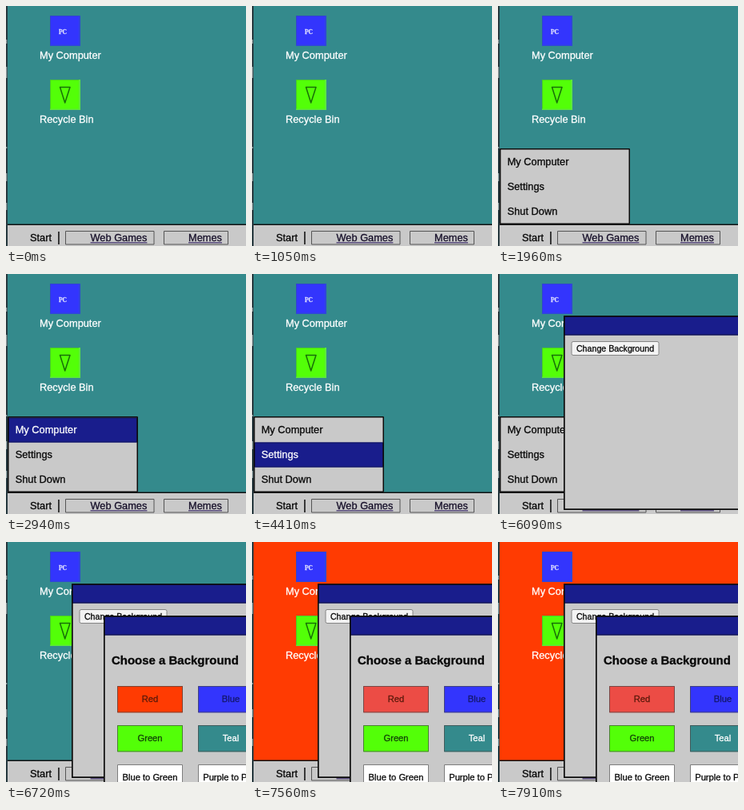
An HTML page with a canvas for the animation above (8000 ms loop, 300 by 300 pixels).

```html
<!DOCTYPE html>
<html lang="en">
<head>
<meta charset="utf-8">
<title>Desktop</title>
<style>
html, body { margin: 0; width: 100%; height: 100%; overflow: hidden; background: #348a8c; }
canvas { display: block; width: 100vw; height: 100vh; }
</style>
</head>
<body>
<canvas id="stage"></canvas>
<script>
const LOOP = 8000;
const SANS = '"Liberation Sans", Arial, sans-serif';
const SERIF = '"Liberation Serif", Times, serif';
const C = {
  teal: '#348a8c', red: '#ff3b02', green: '#53ff08', blue: '#3335fd',
  grey: '#c9c9c9', navy: '#191d8c', ink: '#080808'
};
const AT = {
  menu: 1820, settingsWindow: 4480, buttonHover: 6300,
  chooser: 6440, redHover: 7000, redDesktop: 7420
};
// Menu row under the pointer from each time on; -1 is none.
const HOVER = [[0, -1], [2450, 2], [2590, 1], [2870, 0], [3710, 1], [4900, -1]];
const ROWS = ['My Computer', 'Settings', 'Shut Down'];

const canvas = document.getElementById('stage');
const ctx = canvas.getContext('2d');

function fit() {
  const dpr = window.devicePixelRatio || 1;
  canvas.width = Math.round(innerWidth * dpr);
  canvas.height = Math.round(innerHeight * dpr);
}

function rect(x, y, w, h, fill) {
  ctx.fillStyle = fill;
  ctx.fillRect(x, y, w, h);
}

function frame(x, y, w, h, stroke, line = 1) {
  ctx.strokeStyle = stroke;
  ctx.lineWidth = line;
  ctx.strokeRect(x + line / 2, y + line / 2, w - line, h - line);
}

// A hairline outline gives the slightly heavy look of the lettering.
function text(str, x, y, fill, size = 12.8, align = 'left', face = SANS, weight = '') {
  ctx.font = `${weight} ${size}px ${face}`;
  ctx.textAlign = align;
  ctx.fillStyle = ctx.strokeStyle = fill;
  ctx.lineWidth = 0.3;
  ctx.lineJoin = 'round';
  ctx.fillText(str, x, y);
  ctx.strokeText(str, x, y);
}

function icon(y, fill, light, dark, label) {
  rect(55, y, 38, 38, fill);
  rect(55, y, 38, 1, dark);
  rect(55, y, 1, 38, dark);
  rect(91, y, 2, 38, light);
  rect(55, y + 36.5, 38, 1.5, light);
  text(label, 42, y + 54, '#fff');
}

function desktop(fill) {
  rect(0, 0, 300, 300, fill);
  icon(12, C.blue, '#3046da', '#2f45cc', 'My Computer');
  text('PC', 66, 34.5, '#dcdcff', 7.5, 'left', SERIF, 'bold');
  icon(92, C.green, '#5ce83c', '#48cc28', 'Recycle Bin');
  ctx.beginPath();
  ctx.moveTo(67.5, 101.5);
  ctx.lineTo(80, 101.5);
  ctx.lineTo(73.7, 121);
  ctx.closePath();
  ctx.strokeStyle = '#187008';
  ctx.lineWidth = 1.5;
  ctx.stroke();
}

function link(label, x, w, textX) {
  frame(x, 281, w, 17.5, '#555');
  text(label, textX, 294, '#17102a');
  rect(textX, 295.2, ctx.measureText(label).width, 1.2, '#40306c');
}

function taskbar() {
  rect(0, 273, 300, 27, C.grey);
  rect(0, 272.5, 300, 1.5, '#111');
  text('Start', 30, 294, C.ink);
  rect(65.2, 282, 1.5, 16, C.ink);
  link('Web Games', 74, 111.5, 105.5);
  link('Memes', 197, 81, 228);
}

function screenEdge() {
  rect(0, 0, 2, 300, '#26383e');
  for (const [y, h] of [[42, 5], [76, 14], [176, 2], [209, 10], [246, 9]]) {
    rect(0, y, 1.3, h, '#8fa0a3');
  }
}

function startMenu(active) {
  rect(2, 178, 163, 95, C.grey);
  ROWS.forEach((label, i) => {
    const y = 179.5 + i * 31;
    if (i === active) {
      rect(3, y, 161, 31, C.navy);
      frame(3, y, 161, 31, '#10145c');
    }
    text(label, 11.7, y + 19.8, i === active ? '#fff' : C.ink);
  });
  frame(2, 178, 163, 95, '#0c0c0c', 1.5);
}

function appWindow(x, y, h) {
  rect(x, y, 320, h, C.grey);
  rect(x, y, 320, 24.5, C.navy);
  rect(x, y + 23.5, 320, 1, '#0e1040');
  frame(x, y, 320, h, '#0c0c0c', 1.7);
}

function settingsWindow(hover) {
  appWindow(82, 52, 243);
  ctx.beginPath();
  ctx.roundRect(92, 84.5, 109, 17, 2);
  ctx.fillStyle = hover ? '#e5e5e5' : '#f3f3f3';
  ctx.fill();
  ctx.strokeStyle = '#858585';
  ctx.lineWidth = 1;
  ctx.stroke();
  text('Change Background', 146.5, 96.7, C.ink, 10.67, 'center');
}

function swatch(label, x, y, fill, ink) {
  rect(x, y, 82, 33.3, fill);
  frame(x, y, 82, 33.3, 'rgba(70, 70, 70, 0.7)');
  text(label, x + 41, y + 20, ink, 11.2, 'center');
}

function chooser(redHover) {
  appWindow(122, 92, 260);
  text('Choose a Background', 132, 153, C.ink, 14.98, 'left', SANS, 'bold');
  swatch('Red', 139, 180, redHover ? '#ec4c45' : C.red, '#5c1a0c');
  swatch('Blue', 240, 180, C.blue, '#15186e');
  swatch('Green', 139, 229, C.green, '#124208');
  swatch('Teal', 240, 229, C.teal, '#fff');
  swatch('Blue to Green', 139, 278, '#fff', C.ink);
  swatch('Purple to Pink', 240, 278, '#fff', C.ink);
}

function hoverRow(t) {
  return HOVER.filter(([start]) => t >= start).pop()[1];
}

function draw(t) {
  ctx.setTransform(canvas.width / 300, 0, 0, canvas.height / 300, 0, 0);
  desktop(t >= AT.redDesktop ? C.red : C.teal);
  taskbar();
  screenEdge();
  if (t >= AT.menu && t < AT.chooser) startMenu(hoverRow(t));
  if (t >= AT.settingsWindow) settingsWindow(t >= AT.buttonHover && t < AT.chooser);
  if (t >= AT.chooser) chooser(t >= AT.redHover);
}

function tick() {
  draw(performance.now() % LOOP);
  requestAnimationFrame(tick);
}

addEventListener('resize', fit);
fit();
tick();
</script>
</body>
</html>
```
